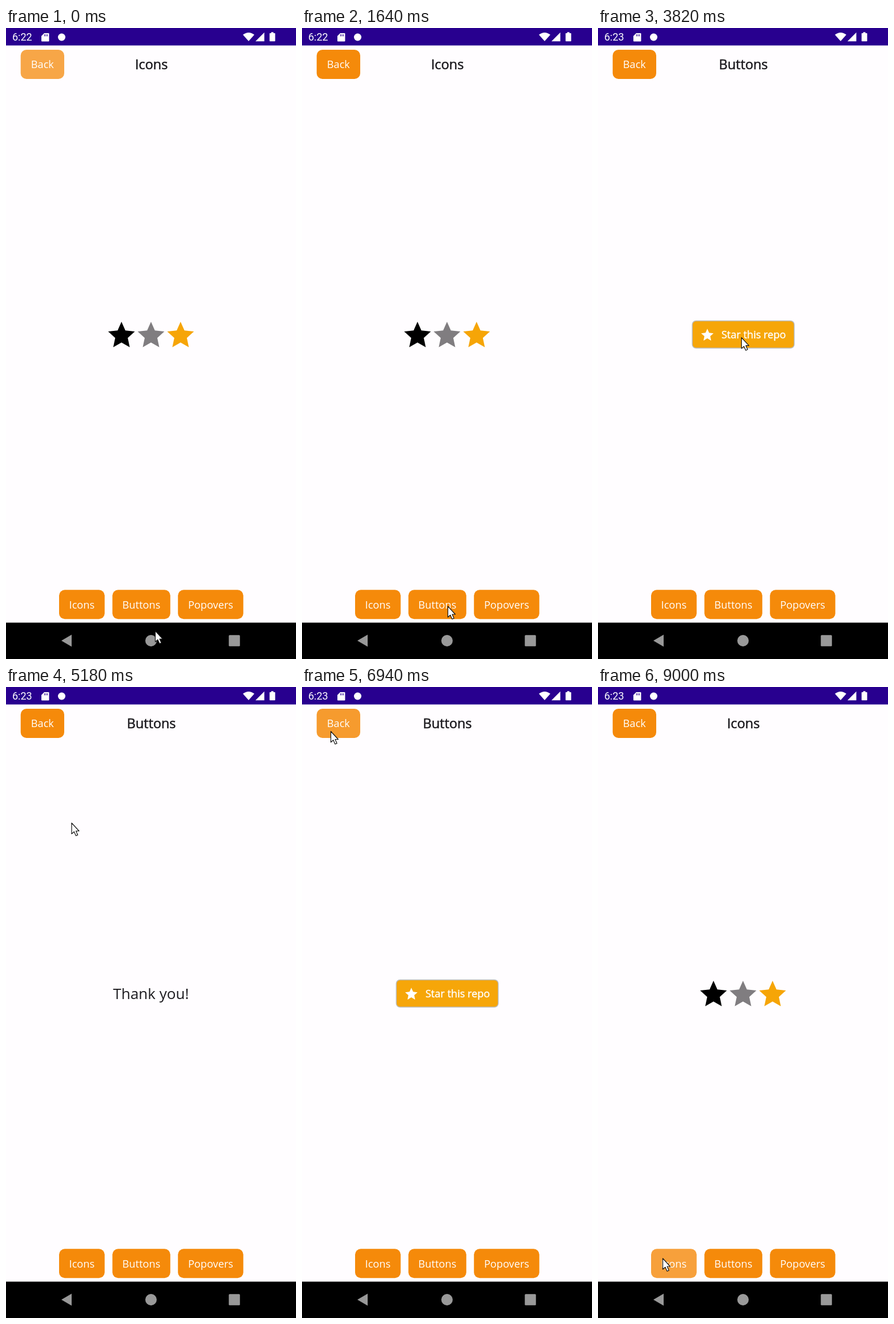
Recreate the animation shown at these times as an HTML page. Size 508x1102 px, loop 9.03 s.

```html
<!DOCTYPE html>
<html lang="en">
<head>
<meta charset="utf-8">
<title>Star demo</title>
<style>
  html, body { margin: 0; width: 100%; height: 100%; overflow: hidden; background: #fffdff; }
  svg { display: block; width: 100%; height: 100%; font-family: "Open Sans", sans-serif; }
  .btn rect { fill: #f58a0a; }
  .btn text { fill: #fff; font-size: 18.2px; text-anchor: middle; }
  #title { font-size: 23.4px; text-anchor: middle; fill: #1c1b1f; stroke: #1c1b1f; stroke-width: .55; }
  #thanks { font-size: 26px; text-anchor: middle; fill: #1c1b1f; }
  #clock { font: 18px Roboto, sans-serif; fill: #fff; }
</style>
</head>
<body>
<svg viewBox="0 0 508 1102">
  <rect width="508" height="1102" fill="#fffdff"/>
  <rect width="508" height="30.5" fill="#28008f"/>
  <text id="clock" x="11" y="22.3"></text>
  <g fill="#fff">
    <path d="M67 9h7.500q1 0 1 1v12.500q0 1-1 1h-11.500q-1 0-1-1v-8.500z"/>
    <circle cx="97.500" cy="16" r="6.500"/>
    <path d="M425 23L415 11.800Q425 4 435 11.800z"/>
    <path d="M437 23.300H452.500V7.800z"/>
    <path d="M464.500 9v-1.700h4v1.700h2.200q.8 0 .8 .8v12.700q0 .8-.8 .8h-8.200q-.8 0-.8-.8v-12.700q0-.8 .8-.8z"/>
  </g>
  <path d="M67.500 11v3.500M70 11v3.500M72.500 11v3.500" stroke="#28008f" stroke-width="1.100"/>

  <text id="title" x="254.700" y="72"></text>
  <g id="buttons"></g>

  <g id="icons"></g>
  <g id="star">
    <rect x="165.200" y="511.500" width="178.500" height="47.500" rx="6.500" fill="#f6a609" stroke="#bcbab5" stroke-width="1.500"/>
    <text x="216.200" y="542" font-size="18.100" fill="#fff" stroke="#fff" stroke-width=".4">Star this repo</text>
  </g>
  <text id="thanks" x="254" y="545.300">Thank you!</text>

  <rect y="1038.500" width="508" height="63.500"/>
  <g fill="#999">
    <path d="M97 1070L115 1059.500V1080.500z"/>
    <circle cx="254" cy="1070" r="10"/>
    <rect x="390.300" y="1060.300" width="19.500" height="19.500" rx="1.500"/>
  </g>
  <path id="cursor" d="M0 0V19L4.300 15.200L7.500 22.300L10.700 20.900L7.600 14H13z" fill="#fff" stroke="#111" stroke-width="1.200" stroke-linejoin="round"/>
</svg>
<script>
const LOOP = 9030, FADE = 900;
const $ = id => document.getElementById(id);

// Label, x, y, width, times of the clicks
const buttons = [
  ["Back", 25.7, 38, 76.3, [-150, 6490]],
  ["Icons", 93, 981.2, 79.8, [8700]],
  ["Buttons", 186.4, 981.2, 101.4, [1790]],
  ["Popovers", 301.2, 981.2, 114.5, []]
];
$("buttons").innerHTML = buttons.map(([label, x, y, w]) =>
  `<g class="btn"><rect x="${x}" y="${y}" width="${w}" height="51" rx="10"/>
   <text x="${x + w / 2}" y="${y + 32.3}">${label}</text></g>`).join("");
const plates = document.querySelectorAll(".btn rect");

function star(cx, cy, r, color) {
  const points = Array.from({ length: 10 }, (_, i) => {
    const a = i * Math.PI / 5, d = i % 2 ? r * 0.47 : r;
    return [cx + d * Math.sin(a), cy - d * Math.cos(a)].map(v => v.toFixed(2));
  });
  return `<polygon points="${points.join(" ")}" fill="${color}"/>`;
}
$("icons").innerHTML = star(202.3, 537.7, 24.6, "#000") +
  star(254, 537.7, 24.6, "#807d80") + star(305.8, 537.7, 24.6, "#f6a507");
$("star").insertAdjacentHTML("beforeend", star(191.5, 536.7, 11.4, "#fff"));

// Pointer stops: time, x, y
const path = [
  [0, 261.5, 1053], [800, 256, 1012], [1640, 255.5, 1010], [2000, 255.5, 1010],
  [2730, 260, 921], [3400, 252, 541], [4500, 250, 540], [5180, 115, 237.5],
  [5600, 54, 80], [6940, 50.5, 77.5], [7150, 52, 78], [7780, 110, 1002],
  [7880, 111, 1005], [8600, 112, 1003], [9000, 113.5, 998], [LOOP, 113.5, 998]
];
function pointer(t) {
  const i = path.findIndex(p => p[0] > t);
  const [t0, x0, y0] = path[i - 1], [t1, x1, y1] = path[i];
  const u = (t - t0) / (t1 - t0), e = u * u * (3 - 2 * u);
  return [x0 + (x1 - x0) * e, y0 + (y1 - y0) * e];
}

const show = (id, on) => $(id).setAttribute("visibility", on ? "visible" : "hidden");

function draw(t) {
  const onButtons = t >= 1850 && t < 8740;
  const thanked = t >= 3850 && t < 6520;
  $("clock").textContent = t < 2100 ? "6:22" : "6:23";
  $("title").textContent = onButtons ? "Buttons" : "Icons";
  show("icons", !onButtons);
  show("star", onButtons && !thanked);
  show("thanks", thanked);
  buttons.forEach((b, i) => {
    const click = b[4].find(c => t >= c && t < c + FADE);
    const glow = click === undefined ? 0 : 0.3 * (1 - (t - click) / FADE);
    plates[i].setAttribute("fill-opacity", 1 - glow);
  });
  $("cursor").setAttribute("transform", `translate(${pointer(t)})`);
}

const start = performance.now();
function tick() {
  draw((performance.now() - start) % LOOP);
  requestAnimationFrame(tick);
}
tick();
</script>
</body>
</html>
```
